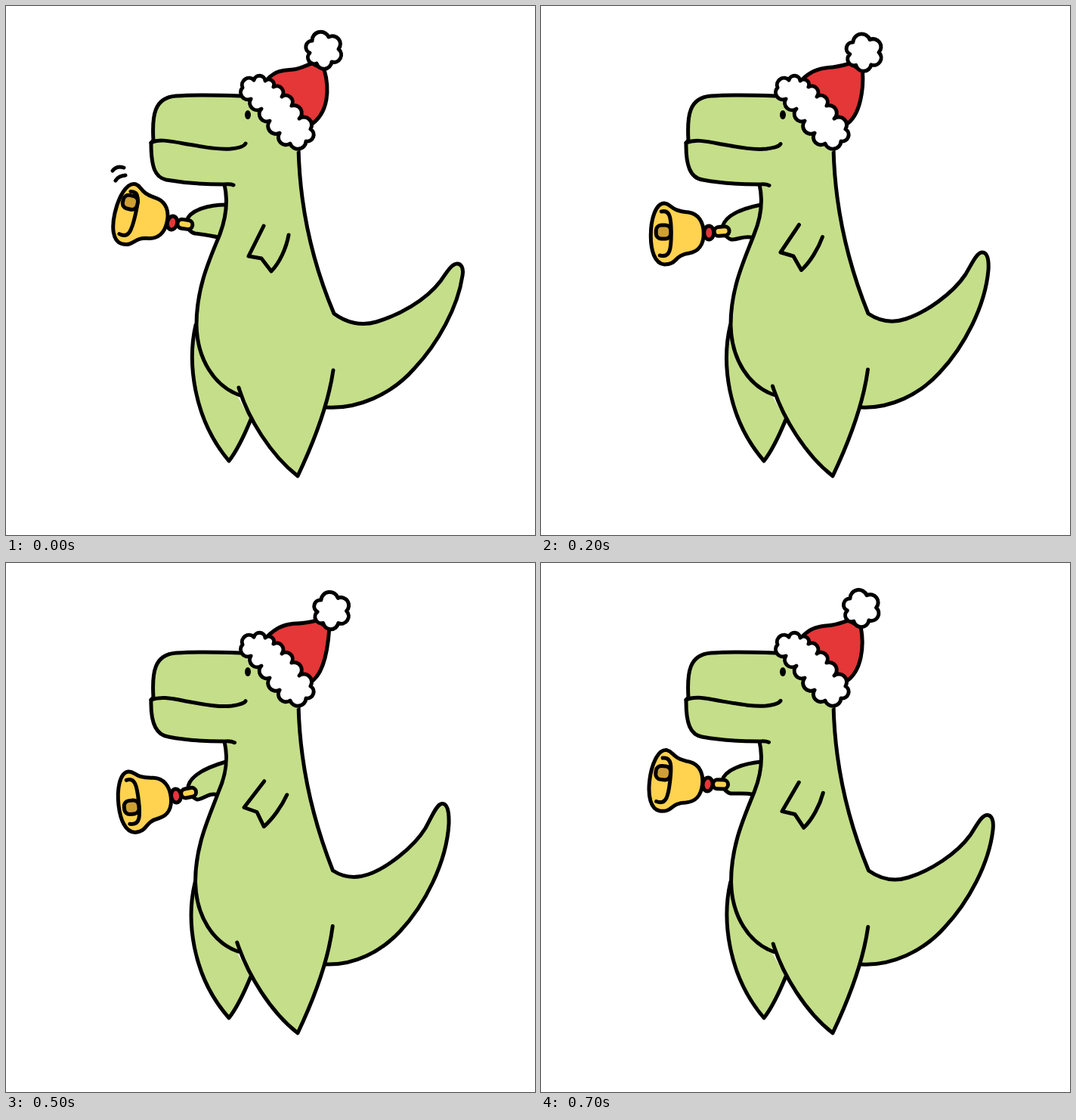
An HTML page for the animation above (0.8 s loop, 700 by 700 pixels).

```html
<!DOCTYPE html>
<html lang="en">
<head>
<meta charset="utf-8">
<title>Dinosaur ringing a bell</title>
<style>
  html, body { margin: 0; width: 100%; height: 100%; overflow: hidden; background: #fff; }
  svg { display: block; width: 100%; height: 100%; }
</style>
</head>
<body>
<svg id="stage" viewBox="0 0 700 700" fill="none" stroke="#000" stroke-width="5"
     stroke-linecap="round" stroke-linejoin="round"></svg>
<script>
const GREEN = '#c5de89', RED = '#e53638', GOLD = '#ffd250', BRASS = '#cf9f34';
const stage = document.getElementById('stage');

const path = (d, fill = 'none', extra = '') => `<path d="${d}" fill="${fill}" ${extra}/>`;
const group = (transform, ...parts) => `<g transform="${transform}">${parts.join('')}</g>`;

// Two open outlines share one fill, but only the outlines are stroked.
const joined = (a, b) => path(`M${a}L${b}`, GREEN, 'stroke="none"') + path(`M${a}M${b}`);

// Closed fluffy outline with an outward arc between neighbouring points.
function fluff(points) {
  const arcs = points.map(([x, y], i) => {
    const [u, v] = points[(i + 1) % points.length];
    const r = Math.hypot(u - x, v - y) * 0.51;
    return `A${r} ${r} 0 0 1 ${u} ${v}`;
  });
  return path(`M${points[0]}${arcs.join('')}Z`, '#fff');
}

const pompom = fluff([[405, 46], [427, 41], [440, 57], [431, 74], [411, 76], [402, 62]]);
const brim = fluff([[313, 108], [328, 98], [343, 99], [354, 107], [365, 120], [378, 132],
  [388, 149], [403, 163], [397, 179], [376, 182], [362, 168], [349, 152], [338, 136], [324, 123]]);

// "a~b" in a path is a value that runs from a (bell up) to b (bell down).
const body = '289 236C294 258 292 278 283~281 302C270 334 252~250 372 252~250 422C253~251 468 276~274 503 309~307 515~514';
const tail = '423 531C465~460 534~532 510~492 514 540~515 480~490C572~548 446~455 598~578 398~396 604~580 357~341' +
  'C606~580 346~320 602~577 341~310 597~570 341~311C590~563 341~312 584~557 351~330 575~548 364~347' +
  'C555~534 390~372 520~498 409~402 490~476 418~410C470~460 424~416 450~447 419~416 434~432 407C412 355 389 280 387 188';
const snout = '195 178C193 145 196 121 225 119C255 117 285 118 310 119';
const jaw = '390 190L301~303 237~238';
const chin = '301~303 237~238C297 235 293 236 288 236C260 236 235 234 212~216 230C198~196 227~228 192~191 215~205 192 181';

function bell(p) {
  const x = 220 + 9 * p * p, y = 287 + 22 * p + 8 * p * p;
  const swing = -14 + 18 * p + 16 * p * p;
  return group(`translate(${x} ${y}) rotate(${13 - 26 * p})`,
    `<rect x="7" y="-6.5" width="20" height="12" rx="6" fill="${GOLD}" transform="rotate(-5)"/>`,
    `<ellipse rx="6.5" ry="9" fill="${RED}"/>`,
    path('M-59 -39C-49 -38 -52 -29 -27 -27C-14 -25 -7 -14 -7 1C-7 16 -14 25 -26 27C-47 30 -41 42 -59 42C-72 41 -77 23 -77 4C-77 -17 -71 -39 -59 -39Z', GOLD),
    path('M-63 -28C-51 -31 -50 -18 -50 1C-50 20 -51 34 -65 30'),
    `<rect x="-70" y="${swing - 9}" width="19.5" height="18" rx="7" fill="${BRASS}"/>`);
}

function scene(p) {
  const mix = s => s.replace(/(-?[\d.]+)~(-?[\d.]+)/g, (_, a, b) => +a + (b - a) * p);
  const marks = p === 0 ? 'M141 218C145 213 150 212 156 214M145 231C148 226 152 225 158 224'
    : p === 1 ? 'M184 384C190 386 196 383 198 378M184 395C190 399 198 396 200 391' : '';
  return mix([
    path('M291 263C270~267 263~272 244~246 269~283 239~242 284~298C238~241 292~306 243~247 299~315 250~254 301~317C262~263 302~316 269~267 304~303 281~280 306~307', GREEN),
    path('M251~250 422C240~238 470 247~244 545 295 602C306 588 317 564 324 547', GREEN),
    bell(p),
    joined(body, tail),
    path('M308~305 505~501C320 545 350 594 386 622C404 584 426 530 433~432 482~480', GREEN),
    path(`M${snout}L${jaw}L${chin}`, GREEN, 'stroke="none"'),
    path(`M${snout}M${chin}`),
    path('M195 178L192 181C200~205 176~177 215 178 235~238 182~183C265~270 187~189 280~285 190~191 297~300 189C309~310 188~187 315 186 317 182~183'),
    '<ellipse cx="320" cy="144" rx="4" ry="6" fill="#000" stroke="none"/>',
    path('M341~342 291~288L321~313 331~321L338~330 334~328L351~338 351~348C362~350 340~338 371~363 320~322 374~371 303~308'),
    path('M346 97C357 85~86 368~370 85~80 380 84~79C390~392 83~79 398~402 78~79 405~413 76L421~430 84~88C428~426 108~105 428~420 142~150 402 158', RED),
    brim,
    group(`translate(${14 * p} ${6 * p}) rotate(${8 * p} 420 58)`, pompom),
    path(marks)
  ].join(''));
}

// The swing goes down and back in eight held steps.
let shown = -1;
function tick(now) {
  const step = Math.floor(now / 100) % 8;
  if (step !== shown) {
    shown = step;
    stage.innerHTML = scene((4 - Math.abs(4 - step)) / 4);
  }
  requestAnimationFrame(tick);
}
tick(0);
</script>
</body>
</html>
```
